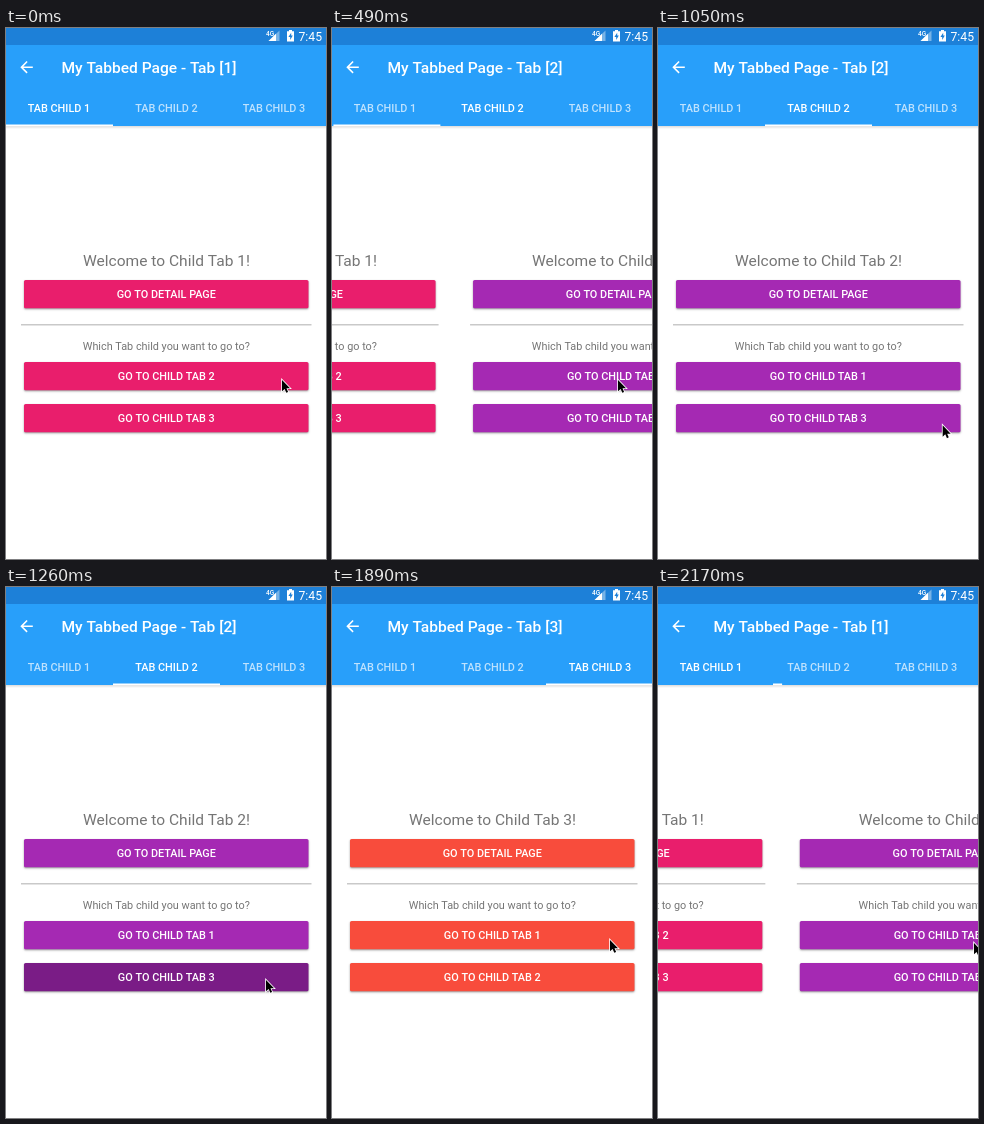
Animation, 320 px wide and 531 px high, one loop 2240 ms. Source, as an HTML page with a canvas:

```html
<!DOCTYPE html>
<html lang="en">
<head>
<meta charset="utf-8">
<title>Tabbed page</title>
<style>
  html, body { margin: 0; width: 100%; height: 100%; overflow: hidden; background: #fff; }
  canvas { display: block; width: 320px; height: 531px; }
</style>
</head>
<body>
<canvas id="stage" width="320" height="531"></canvas>
<script>
const ctx = document.getElementById('stage').getContext('2d');
const LOOP = 2240, STEP = 70, PAGE = 322, TAB = 107;

const pages = [
  { color: '#e91e6c', pressed: '#ac1552', links: [2, 3] },
  { color: '#a529b3', pressed: '#7a1c86', links: [1, 3] },
  { color: '#f84c3c', pressed: '#b8382c', links: [1, 2] }
];

// Each click: when the page starts to slide, between which pages, by which link
const clicks = [
  { at: 455, from: 0, to: 1, link: 0 },
  { at: 1272, from: 1, to: 2, link: 1 },
  { at: 2107, from: 2, to: 0, link: 0 }
];

// Pointer path: time, x, y
const pointer = [
  [0, 276, 352], [350, 266, 351], [455, 266, 351], [560, 326, 354],
  [910, 326, 400], [1120, 264, 396], [1260, 260, 393], [1400, 326, 400],
  [1680, 326, 356], [1890, 278, 353], [2100, 272, 353], [2170, 316, 356]
];

const clamp = v => Math.min(1, Math.max(0, v));
const mix = (a, b, k) => a + (b - a) * k;
const quintOut = k => 1 - (1 - k) ** 5;

// cubic-bezier(.4, 0, .2, 1)
function standardEase(k) {
  let lo = 0, hi = 1, s = 0.5;
  for (let i = 0; i < 20; i++) {
    s = (lo + hi) / 2;
    const x = 1.2 * (1 - s) ** 2 * s + 0.6 * (1 - s) * s * s + s ** 3;
    if (x < k) lo = s; else hi = s;
  }
  return s * s * (3 - 2 * s);
}

function rect(x, y, w, h, color) {
  ctx.fillStyle = color;
  ctx.fillRect(x, y, w, h);
}

function text(str, x, y, size, color, weight = 500, align = 'center') {
  ctx.font = `${weight} ${size}px Roboto, sans-serif`;
  ctx.textAlign = align;
  ctx.fillStyle = color;
  ctx.fillText(str, x, y);
}

function shape(d, x, y, scale, fill, stroke) {
  const path = new Path2D(d);
  ctx.save();
  ctx.translate(x, y);
  ctx.scale(scale, scale);
  if (stroke) {
    ctx.strokeStyle = stroke;
    ctx.lineWidth = 1.6;
    ctx.stroke(path);
  }
  ctx.fillStyle = fill;
  ctx.fill(path);
  ctx.restore();
}

function button(label, y, color) {
  ctx.save();
  ctx.shadowColor = 'rgba(0,0,0,.4)';
  ctx.shadowBlur = 2;
  ctx.shadowOffsetY = 1;
  ctx.fillStyle = color;
  ctx.beginPath();
  ctx.roundRect(18, y, 284.5, 28.3, 1.6);
  ctx.fill();
  ctx.restore();
  text(label, 160.3, y + 18, 10.89, '#fff');
}

function drawPage(index, x, pressedLink) {
  const { color, pressed, links } = pages[index];
  ctx.save();
  ctx.translate(x, 0);
  text(`Welcome to Child Tab ${index + 1}!`, 160.5, 238, 15.56, '#757575', 400);
  button('GO TO DETAIL PAGE', 252, color);
  rect(15, 296, 290.5, 1.5, '#c9c9c9');
  text('Which Tab child you want to go to?', 160.3, 321.7, 10.85, '#757575', 400);
  links.forEach((n, i) =>
    button(`GO TO CHILD TAB ${n}`, 334 + 42 * i, i === pressedLink ? pressed : color));
  ctx.restore();
}

function drawStatusBar() {
  rect(0, 0, 320, 17, '#1d80d8');
  text('4G', 260, 7.5, 6.5, '#fff', 500, 'left');
  shape('M262.5 13H273.5V2.5Z', 0, 0, 1, 'rgba(255,255,255,.4)');
  shape('M262.5 13H270V5.8Z', 0, 0, 1, '#fff');
  shape('M281 3.2H283V2H286V3.2H288V13.5H281Z', 0, 0, 1, '#fff');
  shape('M285.2 4.8L282.4 9H284.2V12L286.8 7.6H285.2Z', 0, 0, 1, '#1d80d8');
  text('7:45', 316, 12.6, 12.2, '#fff', 400, 'right');
}

function drawHeader(tab, left, right) {
  const shade = ctx.createLinearGradient(0, 98, 0, 101);
  shade.addColorStop(0, 'rgba(0,0,0,.14)');
  shade.addColorStop(1, 'rgba(0,0,0,0)');
  rect(0, 98, 320, 3, shade);
  rect(0, 17, 320, 81, '#289ffa');
  drawStatusBar();
  shape('M20 11H7.83l5.59-5.59L12 4l-8 8 8 8 1.41-1.41L7.83 13H20z', 11.2, 29.8, 0.78, '#fff');
  text(`My Tabbed Page - Tab [${tab + 1}]`, 55.5, 45, 15.56, '#fff', 500, 'left');
  for (let i = 0; i < 3; i++)
    text(`TAB CHILD ${i + 1}`, 53 + 107.5 * i, 83.8, 10.89,
      i === tab ? '#fff' : 'rgba(255,255,255,.7)');
  rect(left, 96.5, right - left, 1.7, '#fff');
}

function drawPointer(t) {
  const i = pointer.findIndex(p => p[0] >= t);
  const [t1, x1, y1] = pointer[i];
  const [t0, x0, y0] = pointer[Math.max(0, i - 1)];
  const k = t1 > t0 ? (t - t0) / (t1 - t0) : 1;
  shape('M0 0V11.3L2.6 9L4.3 12.8L6.1 12L4.5 8.3H8Z', mix(x0, x1, k), mix(y0, y1, k), 1, '#000', '#fff');
}

function draw(t) {
  const last = clicks.filter(c => t >= c.at).pop();
  const next = clicks.find(c => t < c.at);
  const tab = last ? last.to : 0;
  let scroll = 0, left = 0, right = TAB;

  if (last) {
    const { at, from, to } = last;
    const jump = Math.abs(to - from);
    scroll = PAGE * mix(from, to, quintOut(clamp((t - at) / (100 * (jump + 1)))));
    // For distant tabs the indicator grows from just beside its new place
    const near = jump === 1;
    const startLeft = near ? from * TAB : (to + 1) * TAB + 18.7;
    const startRight = near ? startLeft + TAB : startLeft;
    const k = standardEase(clamp((t - at - 13) / 300));
    left = mix(startLeft, to * TAB, k);
    right = mix(startRight, (to + 1) * TAB, k);
  }

  rect(0, 0, 320, 531, '#fff');
  pages.forEach((_, i) => {
    const x = i * PAGE - scroll;
    const pressed = next && next.from === i && next.at - t <= 85;
    if (Math.abs(x) < 320) drawPage(i, x, pressed ? next.link : -1);
  });
  drawHeader(tab, left, right);
  drawPointer(t);
}

const start = performance.now();
function tick() {
  const t = (performance.now() - start) % LOOP;
  draw(Math.floor(t / STEP) * STEP);
  requestAnimationFrame(tick);
}
tick();
</script>
</body>
</html>
```
